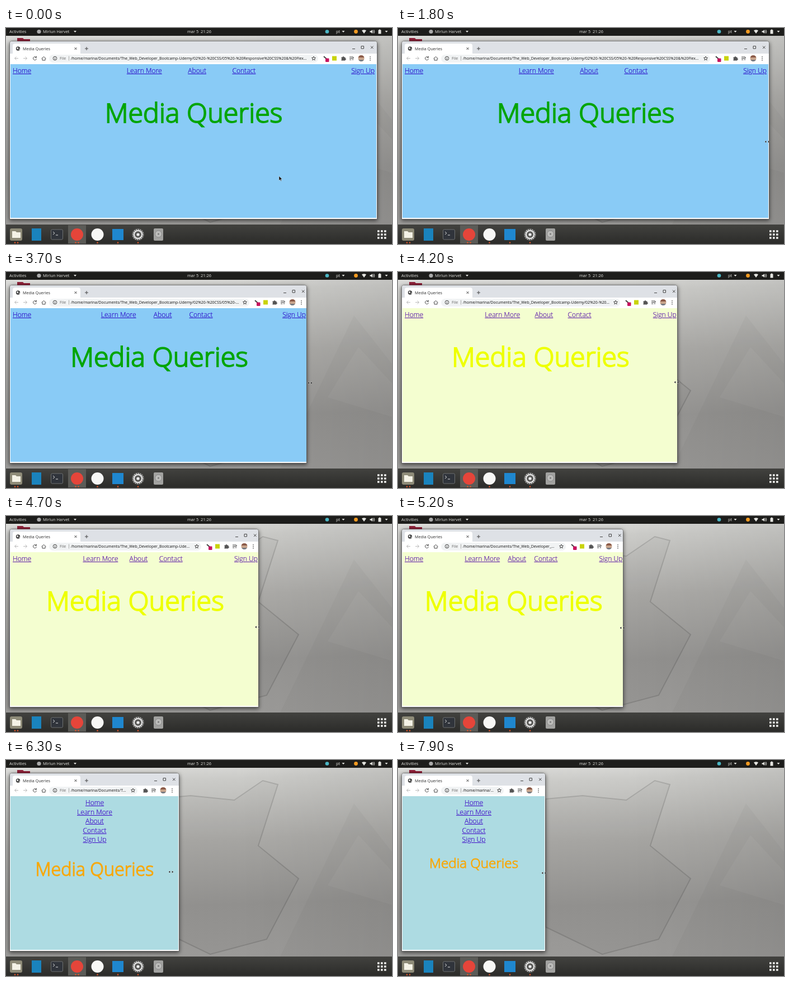
Write an HTML page that moves like this. It is 690x388 px and loops after 8000 ms.

```html
<!DOCTYPE html>
<html lang="en">
<head>
<meta charset="utf-8">
<title>Media Queries</title>
<style>
  html, body { margin: 0; height: 100%; overflow: hidden; }
  body { position: relative; width: 690px; height: 388px; font: 7.4px "Open Sans", sans-serif; }
  svg { position: absolute; left: 0; top: 0; overflow: visible; }
  .line { fill: none; stroke: #444; stroke-width: 1; }
  .window { position: absolute; left: 7px; top: 24px; height: 319px; overflow: hidden; background: #fff;
    border-radius: 4px 4px 0 0; box-shadow: 0 0 0 1px #5558, 0 2px 7px 1px #0009; }
  .layout { position: absolute; inset: 0 auto 0 0; container-type: inline-size; }
  .tabs { position: absolute; width: 100%; height: 22px; background: #dee1e6; }
  .tab { position: absolute; left: 5px; top: 4px; width: 121px; height: 18px; background: #fff; border-radius: 4px 4px 0 0; }
  .label { position: absolute; white-space: nowrap; line-height: 10px; color: #2c2c2c; }
  .pill { position: absolute; left: 70px; right: 105px; top: 24px; height: 14px; border-radius: 7px; background: #f1f3f4; }
  .url { left: 109px; right: 123px; top: 26px; overflow: hidden; text-overflow: ellipsis; color: #111; font-size: 6.95px; }
  .right, .star { left: 100%; }
  .page { position: absolute; inset: 41px 1px 2px; padding: 4px 3px 0 4px; background: #89cbf6; color: #04a504;
    font-size: 8.08px; font-weight: 300; --link: #2a0cc8; }
  nav, ul { display: flex; justify-content: space-between; margin: 0; padding: 0; list-style: none; }
  nav { font-size: 1.5em; line-height: 16.5px; -webkit-text-stroke: .2px; }
  ul { flex: 1; max-width: 50%; justify-content: space-evenly; }
  nav a { color: var(--link); text-decoration: underline; white-space: nowrap; }
  h1 { margin: .67em 0; font-size: 6em; font-weight: 300; line-height: 1.362; text-align: center; white-space: nowrap;
    -webkit-text-stroke: .04em; }
  @container (max-width: 505px) { .page { background: #f4fed0; color: #eeff00; --link: #5a16a8; } }
  @container (max-width: 388px) {
    .page { background: #addbe2; color: #f7a80a; --link: #3f0bc8; }
    nav, ul { flex-direction: column; align-items: center; }
    ul { max-width: none; }
    h1 { font-size: 4em; }
  }
  @container (max-width: 350px) {
    .extensions { display: none; }
    .star { margin-left: 31px; }
    .pill { right: 74px; }
    .url { right: 92px; }
  }
  @container (max-width: 291px) { h1 { font-size: 3em; } }
</style>
</head>
<body>
<svg width="690" height="388">
  <defs>
    <linearGradient id="wall" x2=".06" y2="1">
      <stop stop-color="#e4e4e2"/><stop offset=".12" stop-color="#cbcbc8"/><stop offset=".4" stop-color="#abaaa7"/>
      <stop offset=".7" stop-color="#969593"/><stop offset="1" stop-color="#9c9b99"/>
    </linearGradient>
    <linearGradient id="shade"><stop offset=".6" stop-opacity="0"/><stop offset="1" stop-opacity=".06"/></linearGradient>
    <linearGradient id="dock" x2="0" y2="1"><stop stop-color="#42423f"/><stop offset="1" stop-color="#2b2b29"/></linearGradient>
  </defs>
  <path fill="url(#wall)" d="M0 0H690V388H0z"/>
  <path fill="url(#shade)" d="M0 0H690V388H0z"/>
  <path fill="#00000007" d="M622 78L690 165V353H490zM630 135L575 225L690 260V200z"/>
  <path fill="#00000008" stroke="#0002" stroke-width="2" d="M264 70L330 64L408 72L459 37L486 44L451 154L523 213L466 322L365 349L264 300z"/>
  <path fill="#8e2038" d="M20 18h10l2 2h11v8H20z"/>

  <path fill="#1d1d1b" d="M0 0H690V14H0z"/>
  <g fill="#e4e4e0" font-size="7.4">
    <text x="6" y="9.2">Activities</text>
    <circle cx="59" cy="6.5" r="3.6" fill="#aaa"/>
    <text x="66" y="9.2">Mirlun Harvet</text>
    <text x="324" y="9.2" xml:space="preserve">mar 5  21:26</text>
    <text x="590" y="9.2">pt</text>
    <path d="M121 5h5l-2.5 3zM600.5 5h5l-2.5 3zM677.5 5h5l-2.5 3z"/>
    <circle cx="574" cy="6.5" r="3.3" fill="#4bb6c4"/>
    <circle cx="625.5" cy="6.5" r="3.4" fill="#f39a21"/>
    <path d="M636 4.5q4-2.5 8 0l-4 5.5zM650.5 5.2h2l2.5-2.2v7l-2.5-2.2h-2z"/>
    <path fill="none" stroke="#e4e4e0" d="M656 4.5q1.5 2 0 4M657.5 3.2q2.5 3.3 0 6.6"/>
    <path d="M665.5 3.5h1.5v-1h2v1h1.5v7h-5z"/>
  </g>

  <path fill="url(#dock)" d="M0 353H690V388H0z"/>
  <path fill="#5b5b57" d="M111 354h32v33h-32z"/>
  <rect x="7" y="360" width="22" height="22" rx="3" fill="#8e8b78"/>
  <path fill="#f4f2e6" d="M11 365h6l2 2h7v10H11z"/>
  <rect x="46" y="360" width="17" height="22" fill="#1a83bd"/>
  <rect x="80.5" y="362" width="21" height="18" rx="2" fill="#30343b" stroke="#6c6f70"/>
  <path d="M84 366l3 2.5l-3 2.5M89 372h4" fill="none" stroke="#ddd"/>
  <circle cx="127" cy="371" r="11" fill="#e5453a"/>
  <circle cx="163.5" cy="371" r="11" fill="#f7f7f5"/>
  <rect x="190" y="361" width="20" height="20" fill="#1f87cf"/>
  <circle cx="236" cy="371" r="11" fill="#5a5a58"/>
  <circle cx="236" cy="371" r="7" fill="none" stroke="#eee" stroke-width="2"/>
  <circle cx="236" cy="371" r="9" fill="none" stroke="#eee" stroke-width="1.5" stroke-dasharray="1.5 2"/>
  <circle cx="236" cy="371" r="2.6" fill="#eee"/>
  <rect x="264" y="360" width="17" height="22" rx="2" fill="#a2a2a0"/>
  <circle cx="272.5" cy="370" r="6" fill="#bcbcba" stroke="#888"/>
  <circle cx="272.5" cy="370" r="1.5" fill="#777"/>
  <g fill="#e2572c">
    <circle cx="16" cy="385.5" r="1.3"/><circle cx="21" cy="385.5" r="1.3"/>
    <circle cx="124.5" cy="385.5" r="1.3"/><circle cx="129.5" cy="385.5" r="1.3"/>
    <circle cx="163.5" cy="385.5" r="1.3"/><circle cx="200" cy="385.5" r="1.3"/><circle cx="236" cy="385.5" r="1.3"/>
  </g>
  <path d="M664 365H680M664 371H680M664 377H680" stroke="#f2f2f0" stroke-width="3.6" stroke-dasharray="3.6 2.4"/>
</svg>

<div class="window" id="frame">
  <div class="layout" id="layout">
    <div class="tabs"><div class="tab"></div></div>
    <div class="pill"></div>
    <svg width="1" height="1">
      <circle cx="14.5" cy="13" r="3.7" fill="#444"/>
      <path d="M12 12l2-1.5l1 2l-1.5 2zM15.5 14l2-1v2z" fill="#fff"/>
      <path class="line" d="M115.5 11l4 4m0-4l-4 4M134 13h6m-3-3v6"/>
      <path class="line" d="M47 28.8a3 3 0 1 0 .5 2.5M47.3 26.5v2.7h-2.7M56.5 31l4-3.5l4 3.5M58 30.5v3.5h5v-3.5"/>
      <path class="line" style="stroke:#bbb" d="M15 30.5H8.5m3-3l-3 3l3 3M24 30.5h6.5m-3-3l3 3l-3 3"/>
      <circle class="line" cx="80.5" cy="30.5" r="3.3"/>
      <path class="line" d="M80.5 30v2.5M80.5 28.3v.8"/>
      <path class="line" style="stroke:#aaa" d="M105.5 26.5v8"/>
    </svg>
    <span class="label" style="left:23px;top:8px;font-size:7.2px">Media Queries</span>
    <span class="label" style="left:89px;top:26px;font-size:7px;color:#666">File</span>
    <span class="label url">/home/marina/Documents/The_Web_Developer_Bootcamp-Udemy/02%20-%20CSS/05%20-%20Responsive%20CSS%20&amp;%20Flexbox/index.html</span>
    <svg class="star" width="1" height="1">
      <path class="line" d="M-113 27l1 2.3l2.5.2l-1.9 1.7l.6 2.5l-2.2-1.4l-2.2 1.4l.6-2.5l-1.9-1.7l2.5-.2z"/>
    </svg>
    <svg class="right" width="1" height="1">
      <path class="line" d="M-44 13.5h5M-28 8.5h4.5v4.5h-4.5zM-11 8.5l4.5 4.5m0-4.5l-4.5 4.5"/>
      <g class="extensions">
        <path d="M-95 27l5 4.5" stroke="#444" stroke-width="2"/>
        <rect x="-92" y="30.5" width="6.5" height="6.5" rx="1" fill="#c8145f"/>
        <rect x="-80" y="26.5" width="8" height="8" fill="#c9d30b"/>
      </g>
      <path d="M-63.5 28.5h2a1.5 1.5 0 0 1 3 0h2v2a1.4 1.4 0 0 1 0 2.8v1.2h-7v-2a1.2 1.2 0 0 0 0-2z" fill="#555"/>
      <path class="line" d="M-49 28h7M-49 30.5h5M-49 33h3.5M-43 34v-4.5h2"/>
      <circle cx="-28" cy="30.5" r="5.5" fill="#c9a58c"/>
      <path d="M-33.3 29a5.5 5.5 0 0 1 10.6 0z" fill="#8b5a48"/>
      <path d="M-32.7 33.3h9.4a5.5 5.5 0 0 1-9.4 0z" fill="#6d7783"/>
      <path d="M-12 27v8" stroke="#555" stroke-width="1.5" stroke-dasharray="1.5 1.5"/>
    </svg>
    <div class="page">
      <nav><a>Home</a><ul><li><a>Learn More</a></li><li><a>About</a></li><li><a>Contact</a></li></ul><a>Sign Up</a></nav>
      <h1>Media Queries</h1>
    </div>
  </div>
</div>

<svg width="1" height="1" id="pointer">
  <path id="arrow" d="M-1-4v8l2-1.8l1.3 2.8l1.2-.6l-1.3-2.6h2.6z" fill="#111" stroke="#fff" stroke-width=".4"/>
  <path id="resize" d="M-4.5 0l3-2.2v4.4zM4.5 0l-3-2.2v4.4z" fill="#111" stroke="#fff" stroke-width=".4"/>
</svg>

<script>
  const LOOP = 8000, STEP = 100, LAYOUT_LAG = 35, LEFT = 7;
  // Each key is [time in ms, position]; the pointer drags the window edge inwards.
  const edgeKeys = [[2200, 663], [3000, 591], [4200, 499], [5200, 402], [6200, 309], [6300, 309], [6900, 263]];
  const pointerX = [[300, 489], [1500, 660], [2200, 660], [3000, 607], [4200, 498], [5200, 401], [6300, 295], [6900, 261]];
  const pointerY = [[300, 270], [1500, 205], [3000, 201], [4200, 198], [5200, 201], [6300, 201], [6900, 203]];
  const byId = id => document.getElementById(id);

  function sample(keys, t) {
    const next = keys.findIndex(key => key[0] > t);
    if (next === 0) return keys[0][1];
    if (next < 0) return keys.at(-1)[1];
    const [t0, a] = keys[next - 1], [t1, b] = keys[next];
    return a + (b - a) * (t - t0) / (t1 - t0);
  }

  function draw(now) {
    const t = Math.floor(now % LOOP / STEP) * STEP;
    const resizing = t >= 1500;
    byId('frame').style.width = sample(edgeKeys, t) - LEFT + 'px';
    byId('layout').style.width = sample(edgeKeys, t - LAYOUT_LAG) - LEFT + 'px';
    byId('pointer').style.transform = `translate(${sample(pointerX, t)}px, ${sample(pointerY, t)}px)`;
    byId('arrow').style.display = resizing ? 'none' : '';
    byId('resize').style.display = resizing ? '' : 'none';
    requestAnimationFrame(draw);
  }
  draw(performance.now());
</script>
</body>
</html>
```
